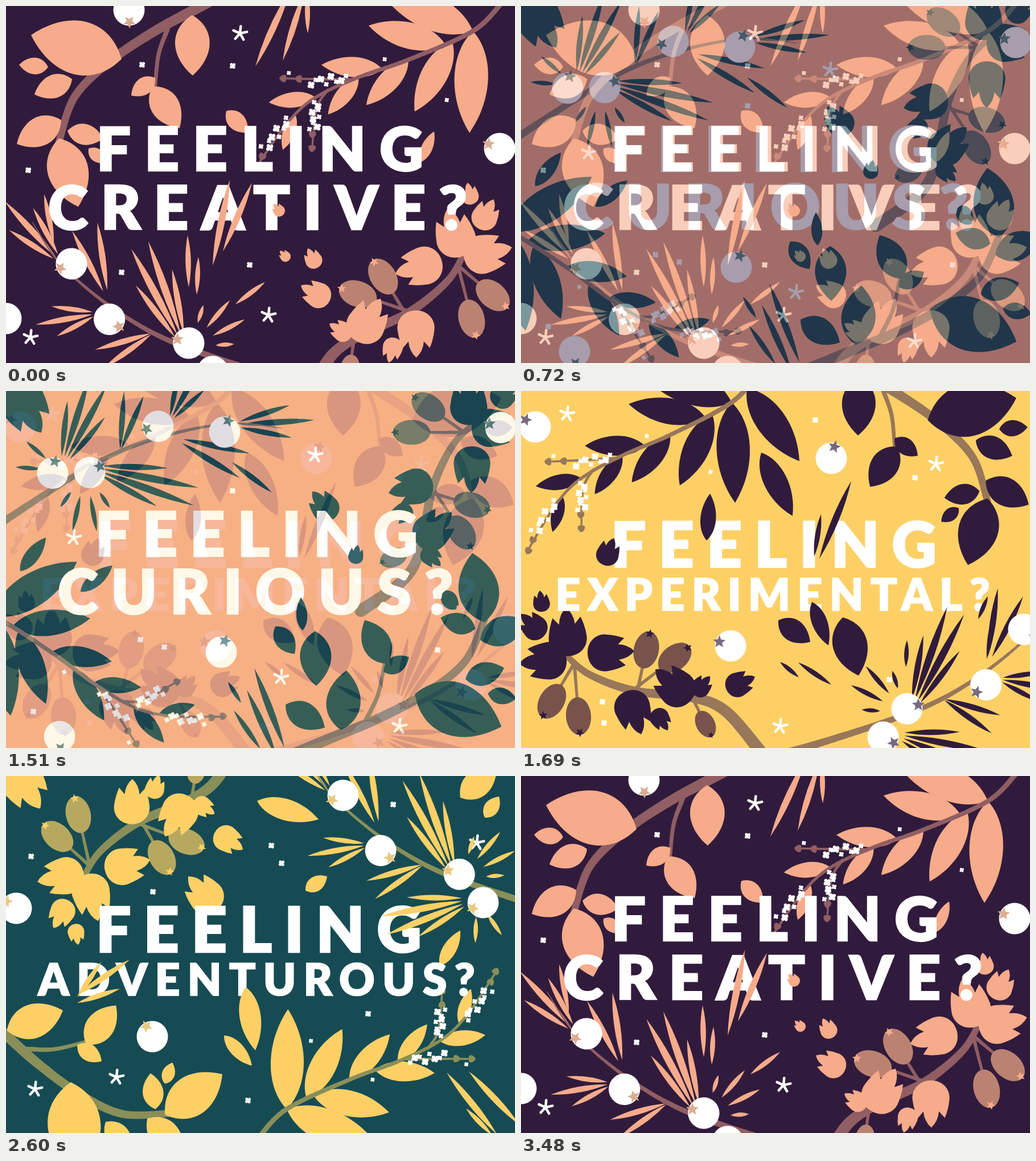
An HTML page with a canvas for the animation above (3.61 s loop, 894 by 626 pixels).

```html
<!DOCTYPE html>
<html lang="en">
<head>
<meta charset="utf-8">
<title>Feeling creative?</title>
<style>
html, body { margin: 0; width: 100%; height: 100%; overflow: hidden; }
canvas { display: block; width: 894px; height: 626px; }
</style>
</head>
<body>
<canvas id="stage" width="894" height="626"></canvas>
<script>
const W = 894, H = 626, LOOP = 3610, RAD = Math.PI / 180;
const FADES = [630, 1510, 2420, 3300], STEP = 30, STEPS = 7;
const stage = document.getElementById('stage').getContext('2d');
let g, pal;

// Calls fn with successive groups of n numbers.
function each(list, n, fn) {
  for (let i = 0; i < list.length; i += n) fn(...list.slice(i, i + n));
}

const polar = (x, y, r, deg) => [x + r * Math.cos(deg * RAD), y + r * Math.sin(deg * RAD)];

// Local frame: x runs 0..1 from base to tip, y spans the width.
function along(x0, y0, x1, y1, width, draw) {
  const dx = x1 - x0, dy = y1 - y0, k = width(Math.hypot(dx, dy));
  g.save();
  g.transform(dx, dy, -dy * k, dx * k, x0, y0);
  g.beginPath();
  for (const s of [1, -1]) {
    g.moveTo(0, 0);
    draw(s);
  }
  g.restore();
  g.fillStyle = pal.leaf;
  g.fill();
}

// Each kind of leaf keeps its own ratio of width to length.
const oval = ratio => (...ends) => along(...ends, () => ratio,
  s => g.bezierCurveTo(0.22, 0.66 * s, 0.66, 0.68 * s, 1, 0));
const leaf = oval(0.57);
const blade = oval(0.33);

const needle = (...ends) => along(...ends, len => (6 + len * 0.04) / len,
  s => g.quadraticCurveTo(0.5, s, 1, 0));

const lobed = (...ends) => along(...ends, () => 0.78, s => {
  g.bezierCurveTo(0, 0.35 * s, 0.22, 0.54 * s, 0.42, 0.5 * s);
  g.quadraticCurveTo(0.62, 0.47 * s, 0.8, 0.37 * s);
  g.lineTo(0.66, 0.21 * s);
  g.quadraticCurveTo(0.87, 0.19 * s, 1, 0);
  g.lineTo(0, 0);
});

function disc(x, y, r, color) {
  g.fillStyle = color;
  g.beginPath();
  g.arc(x, y, r, 0, 7);
  g.fill();
}

function star(x, y, r, deg, color) {
  g.fillStyle = color;
  g.beginPath();
  for (let i = 0; i < 10; i++) g.lineTo(...polar(x, y, i % 2 ? r * 0.45 : r, deg + i * 36));
  g.fill();
}

function ball(x, y, deg) {
  disc(x, y, 27.5, '#fff');
  star(...polar(x, y, 21, deg), 11.5, deg, pal.star);
}

function asterisk(x, y) {
  g.strokeStyle = '#fff';
  g.lineWidth = 4.5;
  g.lineCap = 'round';
  g.beginPath();
  for (let i = 0; i < 5; i++) {
    g.moveTo(x, y);
    g.lineTo(...polar(x, y, 12.5, i * 72 - 84));
  }
  g.stroke();
}

function flower(x, y, r = 5.5) {
  for (let i = 0; i < 4; i++) disc(...polar(x, y, r * 0.6, i * 90 + 50), r * 0.46, '#fff');
  disc(x, y, r * 0.5, '#fff');
}

// Flowers strewn on both sides of a stalk.
function strew(x0, y0, x1, y1, n) {
  const dx = x1 - x0, dy = y1 - y0, len = Math.hypot(dx, dy);
  for (let i = 0; i < n; i++) {
    const t = i / (n - 1), side = 7 * Math.sin(i * 2.4 + 1) / len;
    flower(x0 + t * dx - side * dy, y0 + t * dy + side * dx, i % 2 ? 6.5 : 4.5);
  }
}

function heart(x, y, deg) {
  g.fillStyle = pal.stem;
  g.save();
  g.translate(x, y);
  g.rotate(deg * RAD);
  g.beginPath();
  for (const s of [1, -1]) {
    g.moveTo(-7, 0);
    g.bezierCurveTo(-3, -9 * s, 9, -8 * s, 4, 0);
  }
  g.fill();
  g.restore();
}

// Smooth curve through points; the parameter counts points.
function curve(pts) {
  const last = pts.length / 2 - 1;
  const at = i => {
    const k = Math.max(0, Math.min(last, i));
    return [pts[2 * k], pts[2 * k + 1]];
  };
  const point = u => {
    const i = Math.min(last - 1, Math.floor(u)), t = u - i;
    const [a, b, c, d] = [i - 1, i, i + 1, i + 2].map(at);
    return [0, 1].map(k => b[k] + 0.5 * t * (c[k] - a[k]
      + t * (2 * a[k] - 5 * b[k] + 4 * c[k] - d[k] + t * (3 * (b[k] - c[k]) + d[k] - a[k]))));
  };
  return { point, last };
}

// Strokes a curve whose width runs from w0 to w1.
function stem(pts, w0, w1) {
  const { point, last } = curve(pts), n = last * 12;
  g.strokeStyle = pal.stem;
  g.lineCap = 'round';
  for (let i = 0; i < n; i++) {
    g.lineWidth = w0 + (w1 - w0) * i / n;
    g.beginPath();
    g.moveTo(...point(i / 12));
    g.lineTo(...point((i + 1) / 12));
    g.stroke();
  }
}

// A fruit that hangs on a stalk from a joint.
function hip(jx, jy, x, y, k) {
  const deg = Math.atan2(y - jy, x - jx) / RAD;
  stem([jx, jy, x, y], 6, 4);
  g.fillStyle = pal.hip;
  g.beginPath();
  g.ellipse(x, y, 33 * k, 22 * k, deg * RAD, 0, 7);
  g.fill();
  star(...polar(x, y, 29 * k, deg), 8 * k, deg, pal.leaf);
}

// Needles spread round a point, the middle ones longest.
function fan(x, y, from, to, n, inner, outer) {
  for (let i = 0; i < n; i++) {
    const deg = from + (to - from) * i / (n - 1);
    const reach = outer * (0.5 + 0.5 * Math.sin(Math.PI * (i + 0.5) / n));
    needle(...polar(x, y, inner, deg), ...polar(x, y, reach, deg));
  }
}

function broadBranch() {
  stem([284, 40, 268, 85, 262, 140], 8, 6);
  stem([420, -42, 343, 0, 258, 46, 180, 99, 120, 160, 93, 238], 20, 12);
  each([
    203, 93, 44, 51, 327, 16, 328, 122, 74, 107, 23, 103, 116, 128, 50, 155,
    97, 200, 19, 242, 93, 232, 127, 352, 108, 219, 171, 232, 145, 250, 176, 275,
    262, 126, 220, 157, 257, 141, 305, 214
  ], 4, leaf);
}

function slenderBranch() {
  const path = [418, -34, 370, 20, 262, 77, 178, 113, 106, 153, 62, 198, 14, 276];
  const { point } = curve(path);
  const grow = (u, len, deg) => {
    const base = point(u);
    blade(...base, ...polar(...base, len, deg));
  };
  [1, 1.35, 2, 3, 4.75].forEach((u, i) => grow(u, 176 * 0.78 ** i, 88 + 42 * Math.sin(i * 0.68)));
  [1, 1.45, 2.5, 4].forEach((u, i) => grow(u, 178 * 0.77 ** i, 200 - 10 * i));
  stem([165, 118, 110, 121, 48, 124], 5, 3);
  stem([126, 139, 109, 172, 106, 241], 5, 3);
  stem(path, 9, 3.5);
  each([48, 124, 0, 75, 123, 0, 106, 241, -90, 105, 217, -90, 13, 280, -63, 21, 261, -63], 3, heart);
  strew(157, 118, 96, 126, 8);
  strew(110, 162, 106, 209, 9);
  strew(62, 195, 23, 248, 9);
  each([57, 114, 221, 79, 333, 142], 2, (x, y) => flower(x, y, 4));
}

function pineBranch() {
  each([
    95, 140, -175, -139, 2, 33, 92,
    95, 140, -84, -50, 4, 26, 178,
    200, 107, -86, -67, 2, 5, 125,
    286, 56, -79, -43, 3, 13, 114,
    135, 130, 2, 29, 4, 35, 215,
    140, 140, 57, 125, 4, 45, 112,
    290, 80, 31, 12, 2, 22, 165,
    390, 60, 11, -18, 3, 22, 152
  ], 7, fan);
  stem([-60, 268, 0, 226, 110, 155, 200, 106, 300, 73, 400, 57, 484, 65], 15, 1);
  each([82, 144, 281, 147, 143, 328, 267, 62, 167, 384, 72, 288], 3, ball);
}

function hipBranch() {
  stem([78, 462, 120, 497, 200, 526, 300, 537, 360, 562, 422, 634], 10, 22);
  each([
    92, 480, 54, 544, 1, 94, 482, 101, 570, 1, 205, 523, 220, 454, 1,
    200, 522, 270, 468, 1, 300, 536, 324, 584, 0.75
  ], 5, hip);
  each([
    84, 465, 79, 380, 80, 470, -3, 478, 117, 461, 199, 456, 186, 526, 211, 602,
    298, 543, 236, 488, 304, 533, 332, 500, 234, 559, 258, 595, 38, 387, 33, 350,
    40, 430, 0, 391
  ], 4, lobed);
}

// Similarity that carries p1, p2 to q1, q2, mirrored when flip is set.
function placed([draw, [px, py, rx, ry]], [qx, qy, sx, sy], flip) {
  const m = flip ? -1 : 1;
  const ux = m * (rx - px), uy = ry - py, vx = sx - qx, vy = sy - qy;
  const d = ux * ux + uy * uy;
  const c = (ux * vx + uy * vy) / d, s = (ux * vy - uy * vx) / d;
  g.save();
  g.transform(m * c, m * s, -s, c, qx, qy);
  g.translate(-px, -py);
  draw();
  g.restore();
}

// Each branch with two anchor points.
const BRANCHES = {
  broad: [broadBranch, [328, 122, 127, 352]],
  slender: [slenderBranch, [48, 124, 370, 20]],
  hips: [hipBranch, [54, 544, 270, 468]],
  pine: [pineBranch, [384, 72, 82, 144]]
};
const PARTS = { leaf: [leaf, 4], blade: [blade, 4], needle: [needle, 4], lobed: [lobed, 4], ball: [ball, 3], asterisk: [asterisk, 2], flower: [flower, 2] };
const DARK = '#311b3d', PEACH = '#f6ab8a', TEAL = '#164b54', GOLD = '#fdd066';

const SCENES = [
  {
    pal: { bg: DARK, leaf: PEACH, stem: '#905e63', hip: '#bb8271', star: '#dbad92' },
    spots: { broad: [328, 122, 127, 352], slender: [487, 127, 820, 44], hips: [855, 507, 618, 505], pine: [115, 452, 363, 641] },
    flips: 'hips',
    back: {
      leaf: [387, 184, 425, 222], blade: [728, 274, 752, 220],
      needle: [500, -30, 438, 106, 524, -25, 486, 96, 529, -25, 530, 48, 67, 330, 84, 415],
      lobed: [568, 518, 518, 490, 497, 446, 481, 429, 547, 459, 530, 425],
      ball: [216, 7, 88, 867, 250, 203, 0, 548, 180],
      asterisk: [411, 48, 461, 542, 43, 581],
      flower: [239, 103, 398, 105, 39, 288, 203, 467, 428, 454]
    },
    front: {
      needle: [393, 305, 363, 455, 432, 310, 381, 430, 319, 402, 321, 493, 338, 440, 335, 506, 403, 523, 455, 484],
      lobed: [486, 367, 470, 347]
    },
    lines: [['FEELING', 446, 289, 107, 0.22], ['CREATIVE?', 442, 392, 107, 0.21]]
  },
  {
    pal: { bg: PEACH, leaf: TEAL, stem: '#86796f', hip: '#62706a', star: '#5d8689' },
    spots: { broad: [598, 490, 819, 284], slender: [229, 619, -24, 394], hips: [742, 28, 800, 248], pine: [384, 72, 82, 144] },
    flips: '',
    back: {
      leaf: [473, 413, 507, 461, 543, 421, 545, 517, 491, 550, 560, 590, 767, 351, 795, 376],
      blade: [25, 316, 70, 257, 131, 352, 187, 306],
      needle: [390, 510, 413, 547, 436, 486, 489, 625, 423, 524, 475, 640, 400, 560, 447, 628, 397, 125, 467, 178],
      lobed: [8, -14, 62, 73, 576, 224, 538, 176],
      ball: [869, 64, 198, 378, 458, 288, 94, 606, 85],
      asterisk: [543, 112, 119, 257, 483, 502, 691, 588],
      flower: [398, 175, 236, 436, 278, 449, 758, 454, 48, 562]
    },
    front: { blade: [521, 420, 518, 362], lobed: [612, 303, 618, 270] },
    lines: [['FEELING', 440, 290, 108, 0.2], ['CURIOUS?', 438, 391, 108, 0.21]]
  },
  {
    pal: { bg: GOLD, leaf: DARK, stem: '#98775a', hip: '#78534c', star: '#776a80' },
    spots: { broad: [592, 78, 785, 305], slender: [48, 124, 370, 20], hips: [54, 544, 270, 468], pine: [883, 418, 636, 607] },
    flips: 'broad pine',
    back: {
      leaf: [452, 402, 508, 440, 565, 397, 593, 499],
      blade: [397, -5, 489, 123, 422, 108, 477, 219],
      needle: [678, 437, 676, 484, 455, 475, 488, 502, 487, 476, 545, 515],
      lobed: [361, 524, 411, 501],
      ball: [25, 63, 217, 545, 118, 285, 368, 447, 200],
      asterisk: [81, 40, 729, 128, 455, 588],
      flower: [517, 51, 692, 152, 143, 545, 146, 582, 647, 506]
    },
    front: {
      blade: [326, 262, 332, 180, 511, 370, 540, 446],
      needle: [580, 158, 524, 294, 527, 216, 515, 290, 820, 360, 803, 400, 832, 385, 818, 470],
      lobed: [145, 305, 163, 258]
    },
    lines: [['FEELING', 444, 309, 109, 0.2], ['EXPERIMENTAL?', 442, 385, 77, 0.16]]
  },
  {
    pal: { bg: TEAL, leaf: GOLD, stem: '#8a8f59', hip: '#b7a860', star: '#e9c981' },
    spots: { broad: [100, 411, 380, 523], slender: [818, 496, 493, 584], hips: [90, 106, 317, 115], pine: [592, 34, 838, 222] },
    flips: 'hips',
    back: {
      leaf: [526, 201, 564, 176, 798, 38, 862, -14, 841, 73, 866, 36],
      blade: [441, 44, 549, 76, 762, 333, 798, 271, 383, 455, 432, 508],
      needle: [774, 520, 862, 628, 813, 518, 902, 612, 808, 583, 854, 630],
      lobed: [6, -25, 60, 57, 372, 234, 320, 176, 368, 97, 416, 129],
      ball: [18, 232, 215, 257, 457, 240],
      asterisk: [827, 117, 194, 528, 51, 549],
      flower: [44, 141, 258, 203, 466, 122, 484, 153, 680, 50, 636, 417, 425, 569]
    },
    front: {
      blade: [421, 370, 438, 481],
      needle: [217, 322, 127, 383, 167, 326, 125, 388, 200, 373, 125, 398]
    },
    lines: [['FEELING', 444, 309, 109, 0.2], ['ADVENTUROUS?', 440, 385, 77, 0.17]]
  }
];

function scatter(set) {
  for (const kind in set) each(set[kind], PARTS[kind][1], PARTS[kind][0]);
}

function write([text, x, y, size, tracking]) {
  g.font = `900 ${size}px Lato, sans-serif`;
  g.letterSpacing = size * tracking + 'px';
  g.textAlign = 'center';
  g.fillStyle = g.strokeStyle = '#fff';
  g.lineWidth = size * 0.022;
  g.lineJoin = 'miter';
  g.miterLimit = 3;
  const cx = x + size * tracking / 2;
  g.fillText(text, cx, y);
  g.strokeText(text, cx, y);
}

function paint(scene) {
  const c = document.createElement('canvas');
  c.width = W;
  c.height = H;
  g = c.getContext('2d');
  pal = scene.pal;
  g.fillStyle = pal.bg;
  g.fillRect(0, 0, W, H);
  const put = name => placed(BRANCHES[name], scene.spots[name], scene.flips.includes(name));
  ['broad', 'slender', 'hips'].forEach(put);
  scatter(scene.back);
  scene.lines.forEach(write);
  put('pine');
  scatter(scene.front);
  return c;
}

const pages = SCENES.map(paint);
const start = performance.now();

function frame() {
  const t = Math.max(0, performance.now() - start) % LOOP;
  let page = 0, mix = 0;
  FADES.forEach((at, i) => {
    if (t < at) return;
    const k = Math.min(STEPS, Math.floor((t - at) / STEP) + 1);
    page = k === STEPS ? (i + 1) % 4 : i;
    mix = k === STEPS ? 0 : k / STEPS;
  });
  stage.globalAlpha = 1;
  stage.drawImage(pages[page], 0, 0);
  if (mix) {
    stage.globalAlpha = mix;
    stage.drawImage(pages[(page + 1) % 4], 0, 0);
  }
  requestAnimationFrame(frame);
}
frame();
</script>
</body>
</html>
```
